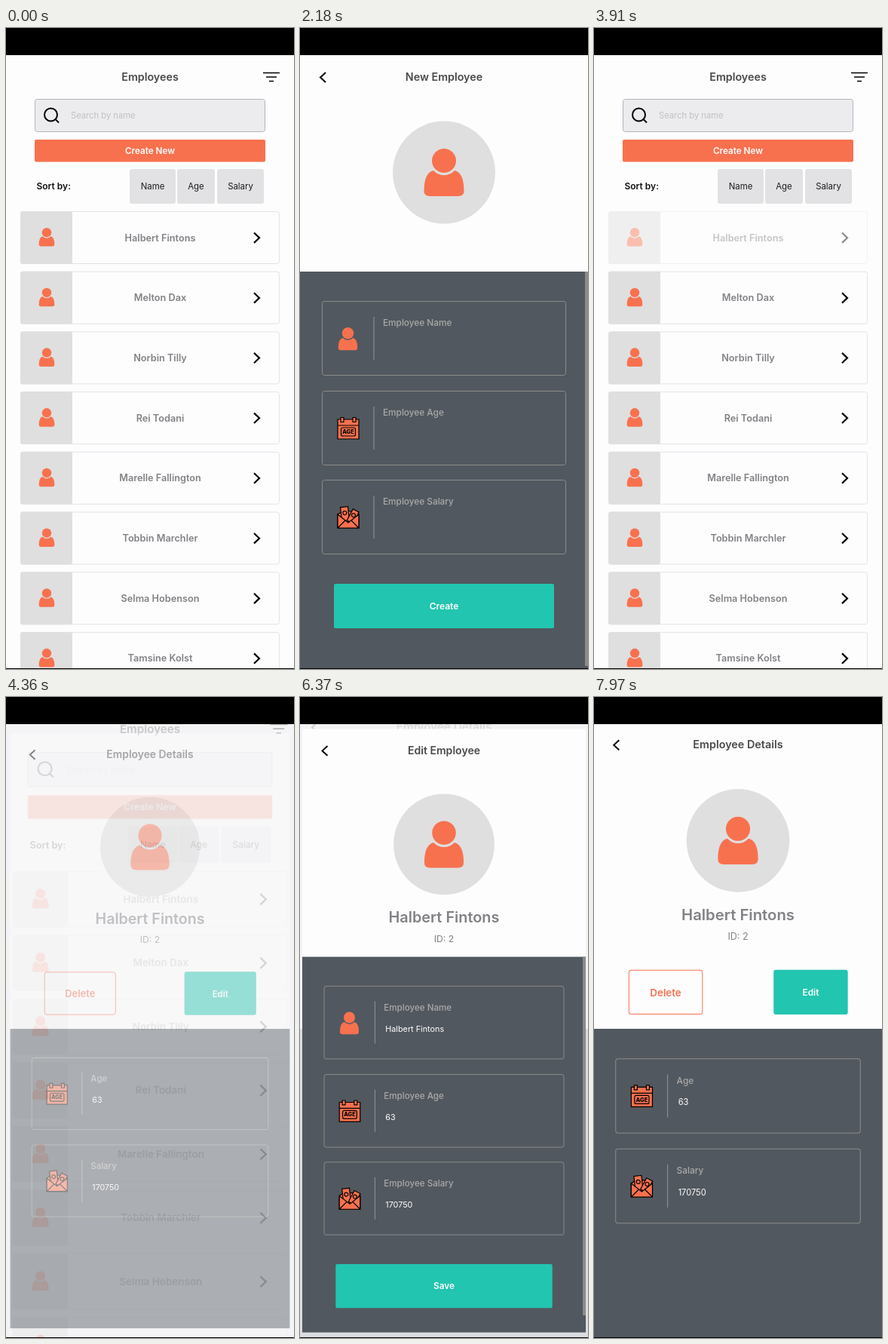
An HTML page for the animation above (8 s loop, 382 by 850 pixels).

```html
<!DOCTYPE html>
<html lang="en">
<head>
<meta charset="utf-8">
<title>Employees</title>
<style>
  html, body { margin: 0; width: 100%; height: 100%; overflow: hidden; background: #000; }
  svg { display: block; width: 382px; height: 850px; font-family: Inter, Roboto, sans-serif; }
</style>
</head>
<body>
<svg id="stage" viewBox="0 0 382 850"></svg>
<script>
const CORAL = '#f8714f', TEAL = '#22c5af', PAPER = '#fdfdfe', MIST = '#dfdfdf',
      SLATE = '#52585f', GREY = '#828286', INK = '#4a4a4c', EDGE = '#8c8c8a';
const NAMES = ['Halbert Fintons', 'Melton Dax', 'Norbin Tilly', 'Rei Todani',
  'Marelle Fallington', 'Tobbin Marchler', 'Selma Hobenson', 'Tamsine Kolst'];

// ---- drawing helpers, each returns SVG markup ----
const rect = (x, y, w, h, fill, r = 0, stroke = 'none') =>
  `<rect x="${x}" y="${y}" width="${w}" height="${h}" rx="${r}" fill="${fill}" stroke="${stroke}"/>`;
const line = (d, color = '#000', width = 2) =>
  `<path d="${d}" fill="none" stroke="${color}" stroke-width="${width}"/>`;
const text = (s, x, y, size, color, weight = 400, anchor = 'middle') =>
  `<text x="${x}" y="${y + size * .36}" font-size="${size}" fill="${color}" font-weight="${weight}" text-anchor="${anchor}">${s}</text>`;
const group = (id, content) => `<g id="${id}">${content}</g>`;

const person = (x, y, scale) => `<g transform="translate(${x} ${y}) scale(${scale})" fill="${CORAL}">
  <circle r="16"/>
  <path d="M-26.5 40Q-26.5 16 -14 13A19 19 0 0 0 14 13Q26.5 16 26.5 40Q26.5 47 19 47H-19Q-26.5 47 -26.5 40Z"/></g>`;

const calendar = y => `<g transform="translate(64 ${y})" stroke="#000" stroke-width="1.2" fill="${CORAL}">
  <path d="M-14 -12H14V14H-14ZM-14 -4H14"/>
  <path d="M-10 -14.5h4v6h-4zM6 -14.5h4v6h-4z"/>
  <rect x="-9.5" y="-1" width="19" height="11" rx="2"/></g>` +
  text('AGE', 64, y + 4.5, 7.5, '#000', 800);

const envelope = y => `<g transform="translate(64 ${y})" stroke="#000" stroke-width="1.2" fill="${CORAL}">
  <path d="M-14 -4L-8 -8H8L14 -4V14H-14Z"/>
  <g transform="rotate(-6 -4 0)"><rect x="-9" y="-14" width="10" height="20"/><circle cx="-4" cy="-6" r="2.5"/></g>
  <g transform="rotate(28 6 0)"><rect x="1" y="-10" width="9" height="17"/><circle cx="5.5" cy="-3" r="2.5"/></g>
  <path d="M-14 -4L0 7L14 -4V14H-14ZM-14 14L-4 4M14 14L4 4"/></g>`;

const card = (y, icon, label, value = '') =>
  rect(29.5, y + .5, 323, 98, 'none', 3, EDGE) + icon +
  line(`M98 ${y + 21}V${y + 78}`, EDGE, 1.2) +
  text(label, 110, y + 29, 11.8, '#a9a9a8', 500, 'start') +
  text(value, 112, y + 58, 11, '#fff', 400, 'start');

const base = (title, panelTop) => rect(0, 36, 382, 813, PAPER) +
  text(title, 191, 65, 14.3, INK, 600) +
  (panelTop ? rect(0, panelTop, 382, 849 - panelTop, SLATE) : '');
const back = id => group(id, line('M34 59L27 65.5L34 72'));
const avatar = `<circle cx="191" cy="191.5" r="68" fill="${MIST}"/>` + person(191, 176, 1);
const identity = text(NAMES[0], 191, 289, 20.2, GREY, 600) + text('ID: 2', 191, 318.5, 12.5, GREY);

const ageCard = (y, label, value) => card(y, calendar(y + 50), label, value);
const payCard = (y, label, value) => card(y, envelope(y + 50), label, value);
const form = (top, button, values) => {
  const y = top + 39;
  return card(y, person(63.5, y + 42.7, .48), 'Employee Name', values[0]) +
    ageCard(y + 119, 'Employee Age', values[1]) +
    payCard(y + 237, 'Employee Salary', values[2]) +
    rect(45, y + 375, 292, 59, TEAL, 2) + text(button, 191, y + 404.5, 12, '#fff', 600);
};
const scrollbar = (y, h) => rect(378, y, 4, h, EDGE);

// ---- pages ----
const row = (name, i) => {
  const y = 243 + 79.7 * i;
  return group('row' + i, rect(19.5, y + .5, 343, 69, PAPER, 3, '#e3e3e8') +
    rect(19, y, 69, 70, MIST, 3) + person(54, y + 28.2, .39) +
    text(name, 204.5, y + 35, 12.7, GREY, 600) +
    line(`M329 ${y + 28.5}l7 6.7l-7 6.7`, '#000', 2.2));
};
const sortButton = (label, x, w) => rect(x, 187, w, 46, '#e2e2e4', 3) + text(label, x + w / 2, 210, 11.4, '#1c1c1e');

const pages = {
  list: base('Employees') +
    line('M341 59.5H363M345 65H359M349 70.5H355', '#000', 1.6) +
    rect(38.5, 94.5, 305, 43, '#ececee', 3, '#b4b4c0') +
    '<circle cx="59.5" cy="115" r="8.5" fill="none" stroke="#000" stroke-width="2"/>' + line('M65.5 121L70 125.5') +
    text('Search by name', 86, 116, 11.2, '#c0c0c6', 400, 'start') +
    group('create', rect(38, 148, 306, 29.5, CORAL, 2) + text('Create New', 191, 162.5, 11.7, '#fff', 600)) +
    text('Sort by:', 40.5, 210, 12, '#111', 600, 'start') +
    sortButton('Name', 164, 61) + sortButton('Age', 227, 50) + sortButton('Salary', 280, 62) +
    NAMES.map(row).join(''),
  add: base('New Employee', 323) + back('backAdd') + avatar + form(323, 'Create', ['', '', '']) + scrollbar(323, 523),
  details: base('Employee Details', 440) + back('backDetails') + avatar + identity +
    rect(47, 362.5, 97, 58, 'none', 3, CORAL) + text('Delete', 95.5, 392, 13.3, CORAL, 600) +
    group('edit', rect(238, 362, 98, 59, TEAL, 3) + text('Edit', 287, 392, 11.8, '#fff', 600)) +
    ageCard(479, 'Age', '63') + payCard(598, 'Salary', '170750'),
  change: base('Edit Employee', 343) + back('backChange') + avatar + identity +
    form(343, 'Save', [NAMES[0], '63', '170750']) + scrollbar(343, 483)
};

const $ = id => document.getElementById(id);
$('stage').innerHTML = '<clipPath id="screen"><rect y="36" width="382" height="813"/></clipPath><g clip-path="url(#screen)">' +
  rect(0, 36, 382, 813, '#f2f2f4') + Object.keys(pages).map(k => group(k, pages[k])).join('') + '</g>';

// ---- motion ----
const LOOP = 8000, SLIDE = 400;
const moves = [
  { at: 680, under: 'list', over: 'add' },
  { at: 2280, under: 'list', over: 'add', closing: true },
  { at: 4243, under: 'list', over: 'details' },
  { at: 6210, under: 'details', over: 'change' },
  { at: 7775, under: 'details', over: 'change', closing: true }
];
const presses = { create: 500, backAdd: 2180, row0: 3820, edit: 5750, backChange: 7680 };

const clamp = x => Math.min(1, Math.max(0, x));
const smooth = x => x < .5 ? 2 * x * x : 1 - 2 * (1 - x) ** 2;
const bezier = (a, b, s) => 3 * (1 - s) ** 2 * s * a + 3 * (1 - s) * s * s * b + s ** 3;
function ease(x) {
  let lo = 0, hi = 1;
  for (let i = 0; i < 24; i++) {
    const mid = (lo + hi) / 2;
    if (bezier(.20833, .25, mid) < x) lo = mid; else hi = mid;
  }
  return bezier(.82, 1, lo);
}

// progress: 0 = not entered, 1 = in front, 2 = covered
function place(id, progress, closing) {
  const opacity = progress <= 1 ? clamp((progress - .75) / .125) : clamp((2 - progress) / .7925);
  const scale = progress > 1 ? 1 + .075 * (progress - 1)
    : closing ? .925 + .075 * progress : .85 + .15 * progress;
  const el = $(id);
  el.style.display = opacity > 0 ? '' : 'none';
  el.setAttribute('opacity', opacity);
  el.setAttribute('transform', `translate(191 442.5) scale(${scale}) translate(-191 -442.5)`);
}

function render(t) {
  for (const id in pages) place(id, 0);
  const move = moves.filter(m => m.at <= t).pop();
  if (move) {
    const e = ease(clamp((t - move.at) / SLIDE));
    const p = move.closing ? 1 - e : e;
    place(move.under, 1 + p);
    place(move.over, p, move.closing);
  } else place('list', 1);

  for (const id in presses) {
    const dt = t - presses[id];
    const down = smooth(clamp(dt / 150)) - smooth(clamp((dt - 150) / 250));
    $(id).setAttribute('opacity', 1 - .8 * down);
  }
}

const start = performance.now();
function tick() {
  render((performance.now() - start) % LOOP);
  requestAnimationFrame(tick);
}
tick();
</script>
</body>
</html>
```
